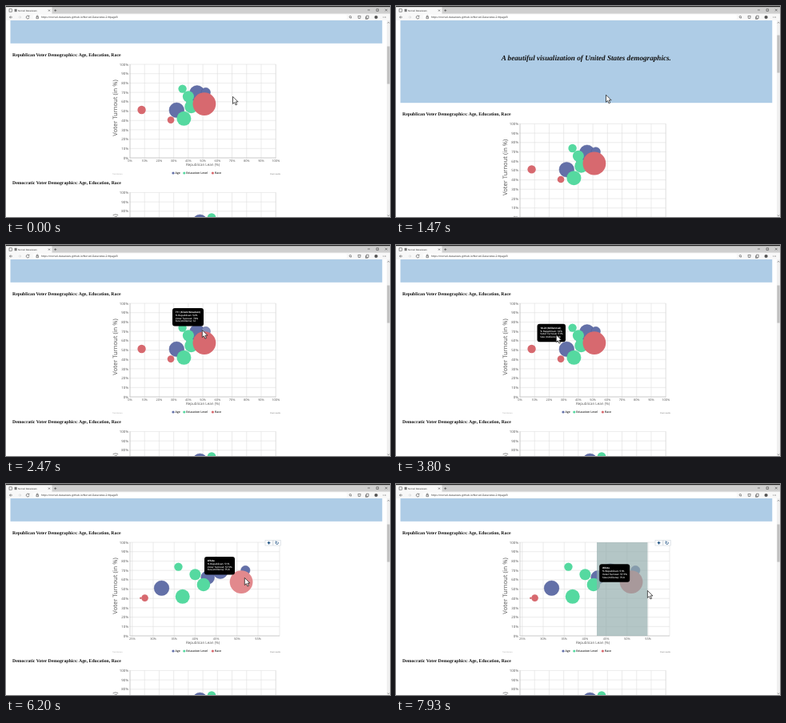
Write an HTML page that moves like this. It is 480 px wide and 264 px high and loops after 8000 ms.

```html
<!DOCTYPE html>
<html lang="en">
<head>
<meta charset="utf-8">
<title>Voter demographics</title>
<style>
  html, body { margin: 0; width: 100%; height: 100%; overflow: hidden; background: #fff; }
  svg { display: block; width: 480px; height: 264px; text-rendering: geometricPrecision; }
  text { font-family: "Open Sans", "Noto Sans", sans-serif; fill: #555; }
  .serif { font-family: "Liberation Serif", "Noto Serif", serif; font-weight: bold; fill: #111; }
  .ui { font-family: "Noto Sans", sans-serif; fill: #333; }
  .mid { text-anchor: middle; }
  .end { text-anchor: end; }
  .icon { fill: none; stroke: #444; stroke-width: .6; }
</style>
</head>
<body>
<svg id="stage" viewBox="0 0 480 264"></svg>
<script>
const LOOP = 8000;
const TOP = 73, BASE = 190, LEFT = 155;
const NAVY = '#6370a8', GREEN = '#55d9a0', RED = '#d7696f';
const LIGHT = { [NAVY]: '#838dba', [GREEN]: '#7ae2b6', [RED]: '#e2898d' };
const stage = document.getElementById('stage');

function add(parent, tag, attrs = {}, content) {
  const node = document.createElementNS('http://www.w3.org/2000/svg', tag);
  for (const k in attrs) node.setAttribute(k, attrs[k]);
  if (content !== undefined) node.textContent = content;
  parent.appendChild(node);
  return node;
}
const rect = (p, x, y, width, height, fill, more) => add(p, 'rect', { x, y, width, height, fill, ...more });
const dot = (p, cx, cy, r, fill) => add(p, 'circle', { cx, cy, r, fill });
const path = (p, d, more) => add(p, 'path', { d, class: 'icon', ...more });
const label = (p, x, y, size, str, cls = '', more) =>
  add(p, 'text', { x, y, 'font-size': size, class: cls, ...more }, str);
const show = (node, on) => node.setAttribute('visibility', on ? 'visible' : 'hidden');
const move = (node, x, y) => node.setAttribute('transform', `translate(${x.toFixed(2)} ${y.toFixed(2)})`);

// lean %, y, radius, colour, tooltip key
const REPUBLICAN = [
  [43, 117, 8.4, NAVY, 'genx'], [46, 109, 9.4, NAVY, 'boomer'], [52, 108, 5.7, NAVY, 'silent'],
  [32, 130.3, 9.3, NAVY, 'mill'],
  [36, 103.6, 5.2, GREEN], [40, 113.3, 7, GREEN], [42, 126, 8.3, GREEN], [37, 140.8, 9, GREEN],
  [8, 130, 5.2, RED], [27, 142.8, 1.2, RED], [28, 142.6, 4.3, RED], [51, 122.6, 14.4, RED, 'white']
];
const DEMOCRATIC = [
  [44, 110, 5.5, NAVY], [48, 110, 9.3, NAVY], [56, 104.2, 5.3, GREEN]
];

const defs = add(stage, 'defs');
rect(add(defs, 'clipPath', { id: 'plot' }), LEFT, TOP, 188, BASE - TOP);

// Axes, grid and bubbles for one x range; returns the bubbles by tooltip key
function drawChart(parent, { min, k, right, ticks, name, data, titleY = 127.5 }) {
  const g = add(parent, 'g');
  const px = v => LEFT + (v - min) * k;
  let grid = '';
  for (let i = 0; i <= 10; i++) {
    const y = BASE - i * 11.7;
    grid += `M${LEFT - 1.5} ${y}H${right}`;
    label(g, 153, y + 1.6, 4.4, i * 10 + '%', 'end');
  }
  for (const v of ticks) {
    grid += `M${px(v)} ${TOP}V${BASE + 1.5}`;
    label(g, px(v), 195.3, 3.9, v + '%', 'mid');
  }
  grid += `M${right} ${TOP}V${BASE}`;
  path(g, grid, { style: 'stroke:#dedede' });
  path(g, `M${LEFT} ${TOP}V${BASE}H${right}`, { style: 'stroke:#bcbcbc' });
  label(g, 246, 200, 4.5, name + ' Lean (%)', 'mid');
  label(g, 0, 0, 7.6, 'Voter Turnout (in %)', 'mid', { transform: `translate(139.3 ${titleY}) rotate(-90)` });

  const marks = {};
  const plot = add(g, 'g', { 'clip-path': 'url(#plot)' });
  for (const [v, y, r, fill, key] of data) {
    const c = dot(plot, px(v), y, r, fill);
    if (fill === NAVY) { c.setAttribute('stroke', '#4d5995'); c.setAttribute('stroke-width', .5); }
    if (key) marks[key] = { c, x: px(v), y, r, fill };
  }
  [[209, NAVY, 'Age'], [222.8, GREEN, 'Education Level'], [258.4, RED, 'Race']].forEach(([x, fill, str]) => {
    dot(g, x, 209, 1.6, fill);
    label(g, x + 2.5, 210.4, 3.55, str, '', { style: 'fill:#222;font-weight:600' });
  });
  label(g, 133, 211, 2.2, 'Trial Version', '', { style: 'fill:#999' });
  label(g, 343, 211, 2.2, 'Chart credits', 'end');
  return { g, marks };
}

// Page
rect(stage, 0, 0, 480, 264, '#fff');
const page = add(stage, 'g');
rect(page, 5.5, -80, 464.8, 126.8, '#aecce6');
label(page, 237.8, -6, 9.18, 'A beautiful visualization of United States demographics.', 'serif mid', { 'font-style': 'italic' });
['Republican', 'Democratic'].forEach((party, i) =>
  label(page, 8, 63 + i * 160.3, 5.75, party + ' Voter Demographics: Age, Education, Race', 'serif'));

const tens = Array.from({ length: 11 }, (_, i) => i * 10);
const full = { min: 0, k: 1.822, right: 337.3, ticks: tens };
const wide = drawChart(page, { ...full, name: 'Republican', data: REPUBLICAN });
const zoomed = drawChart(page, {
  min: 24.46, k: 5.24, right: 342, ticks: [25, 30, 35, 40, 45, 50, 55], name: 'Republican', data: REPUBLICAN
});
const lower = add(page, 'g', { transform: 'translate(0 160.4)' });
drawChart(lower, { ...full, name: 'Democratic', data: DEMOCRATIC, titleY: 135 });

for (const x of [324, 334]) rect(zoomed.g, x, 70.2, 9.2, 6.8, '#fff', { stroke: '#c4ccd4', 'stroke-width': .5 });
path(zoomed.g, 'M326.8 73.6h3.6M328.6 71.8v3.6', { style: 'stroke:#1b4f80;stroke-width:1.1' });
path(zoomed.g, 'M337.4 72.6a1.7 1.7 0 1 0 2.6 -.1M336.6 72h1.6v1.5', { style: 'stroke:#1b4f80;stroke-width:.8' });

const selection = rect(page, 0, TOP, 0, BASE - TOP, 'rgba(148,174,174,.7)');

// Tooltips
const INFO = {
  silent: ['71+ (Silent/Greatest)', '52%', '70%', '12', 39],
  mill: ['18-23 (Millennial)', '32%', '51%', '30', 35.5],
  genx: ['39-54 (Gen X)', '43%', '62%', '28', 36],
  boomer: ['55-70 (Boomer)', '46%', '69%', '33', 36],
  white: ['White', '51%', '57.5%', '75.8', 38]
};
const tips = {};
for (const key in INFO) {
  const [head, lean, turnout, size, w] = INFO[key];
  const g = tips[key] = add(stage, 'g');
  rect(g, 0, 0, w, 22.5, '#000', { rx: 3 });
  [head, '% Republican: ' + lean, 'Voter Turnout: ' + turnout, 'Size (millions): ' + size].forEach((str, i) =>
    label(g, 3.8, 6.2 + i * 3.75, 3.05, str, '', { style: `fill:#fff;font-weight:${i ? 600 : 700}` }));
}

// Scrollbar
rect(stage, 476, 18, 4, 246, '#f0f0f0');
const thumb = rect(stage, 476.4, 50.5, 3.2, 47, '#bfbfbf');
path(stage, 'M477 21.5l1.1 -1.2l1.1 1.2M477 261.5l1.1 1.2l1.1 -1.2');

// Browser frame
rect(stage, 0, 0, 480, 10, '#cfcfcf');
rect(stage, 0, 0, 480, 1.2, '#222');
rect(stage, 0, 1.6, 57.5, 8.6, '#f8f8f8');
rect(stage, 0, 9.6, 480, 8.4, '#f8f8f8');
rect(stage, 34, 10.8, 392, 6.2, '#fff', { rx: 2 });
rect(stage, 4, 3.8, 3.4, 3.4, 'none', { stroke: '#555', 'stroke-width': .6 });
rect(stage, 10.6, 3.8, 3, 3.4, '#777');
label(stage, 15, 6.7, 2.9, 'Norvel Dataviews', 'ui');
label(stage, 44, 15.2, 3.25, 'https://norvel-dataviews.github.io/Norvel-Dataviews-2/#pageB', 'ui');
path(stage, 'M53 4.6l2 2m0 -2l-2 2M60.2 5.6h3M61.7 4.1v3');
path(stage, 'M452 5h3M463 3.8h2.6v2.6h-2.6zM474 3.8l2.6 2.6m0 -2.6l-2.6 2.6');
path(stage, 'M8 14H4.6M6 12.4L4.5 14L6 15.6M28.6 12.8a1.9 1.9 0 1 0 .4 1.6M28.9 11.8v1.3h-1.3');
path(stage, 'M15.5 14h3.2M17.3 12.4l1.5 1.6l-1.5 1.6', { style: 'stroke:#ccc' });
path(stage, 'M37.9 13.7h2.6v2h-2.6zM38.4 13.6v-1a.8 .8 0 0 1 1.6 0v1');
path(stage, 'M432 15.4l-.9 -.9M440 12.4h3.2l-.4 3h-2.4zM450.4 12.2h2.8v3.2h-2.8zM449.6 13.3v3h2.8');
add(stage, 'circle', { cx: 430.4, cy: 13.7, r: 1.2, class: 'icon' });
dot(stage, 462.6, 14, 2.1, '#555');
for (const dx of [0, 1.5, 3]) dot(stage, 471.7 + dx, 14, .45, '#333');

const cursor = path(stage, 'M0 0V9.1L2.1 7.2L3.6 10.6L5.2 9.9L3.7 6.6H6.6Z',
  { style: 'fill:#fff;stroke:#111;stroke-width:.7' });

// Timelines: time, x, y
const POINTER = [
  [70, 283.5, 113.3], [870, 262.5, 111.2], [2250, 262.5, 111.2], [2460, 245.3, 106.5], [2600, 245.3, 106.5],
  [2820, 250, 120], [3080, 246, 131], [3320, 216, 134], [3470, 219, 136], [3600, 213, 128],
  [3790, 200.3, 112.5], [4130, 200.3, 112.5], [4250, 200.3, 113], [4930, 262, 119], [5270, 264.5, 120],
  [6000, 264.5, 120], [6190, 298.3, 117.4], [6270, 298.3, 117.4], [6460, 300.5, 130], [6670, 297, 138],
  [6810, 297, 138], [7100, 251, 134], [7200, 251, 134], [7670, 308, 133], [7920, 314.4, 133.3]
];
const TIP_PATH = [
  [2400, 214, 78], [2470, 208, 79], [2680, 208, 79], [2860, 206, 93], [3080, 201, 104], [3330, 175, 103],
  [3500, 177, 108], [3790, 176.5, 98.8], [4300, 176.5, 98.8], [4550, 199, 92], [4800, 210, 94],
  [5670, 210, 94], [6060, 219.5, 92], [6190, 248, 91], [6270, 248, 91], [6460, 251, 104], [6670, 249, 111],
  [6860, 249, 111], [7060, 226.5, 107], [7460, 248, 100], [7600, 254.2, 100.3]
];
const TIP_KEYS = [
  [0, ''], [2430, 'silent'], [2700, 'white'], [3250, 'mill'], [4260, ''], [4560, 'white'], [5670, ''],
  [6060, 'boomer'], [6130, 'white'], [6960, 'genx'], [7180, ''], [7460, 'white']
];
const ZOOM_AT = 5670, SCROLL = 77;

function track(keys, t) {
  const i = keys.findIndex(k => k[0] > t);
  if (i === 0) return keys[0].slice(1);
  if (i < 0) return keys[keys.length - 1].slice(1);
  const a = keys[i - 1], b = keys[i];
  const u = (t - a[0]) / (b[0] - a[0]), e = u * u * (3 - 2 * u);
  return [a[1] + (b[1] - a[1]) * e, a[2] + (b[2] - a[2]) * e];
}
const easeOut = (t, from, to) => 1 - (1 - Math.min(1, Math.max(0, (t - from) / (to - from)))) ** 3;

function render(t) {
  const scroll = SCROLL * (easeOut(t, 930, 1730) - easeOut(t, 1830, 2400));
  move(page, 0, scroll);
  move(thumb, 0, -scroll * .188);

  const [x, y] = track(POINTER, t);
  move(cursor, x, y);

  const isZoomed = t >= ZOOM_AT;
  show(wide.g, !isZoomed);
  show(zoomed.g, isZoomed);

  const start = t >= 4250 && t < ZOOM_AT ? 200.3 : t >= 7200 ? 251 : null;
  show(selection, start !== null);
  if (start !== null) {
    selection.setAttribute('x', start);
    selection.setAttribute('width', Math.max(0, x - start));
  }

  const active = TIP_KEYS.filter(k => k[0] <= t).pop()[1];
  const [tx, ty] = track(TIP_PATH, t);
  for (const key in tips) {
    show(tips[key], key === active);
    move(tips[key], tx, ty);
  }
  const marks = (isZoomed ? zoomed : wide).marks;
  for (const key in marks) {
    const m = marks[key];
    const hover = key === active && Math.hypot(x - m.x, y - m.y) <= m.r;
    m.c.setAttribute('fill', hover ? LIGHT[m.fill] : m.fill);
  }
}

const begin = performance.now();
function tick() {
  render((performance.now() - begin) % LOOP);
  requestAnimationFrame(tick);
}
tick();
</script>
</body>
</html>
```
